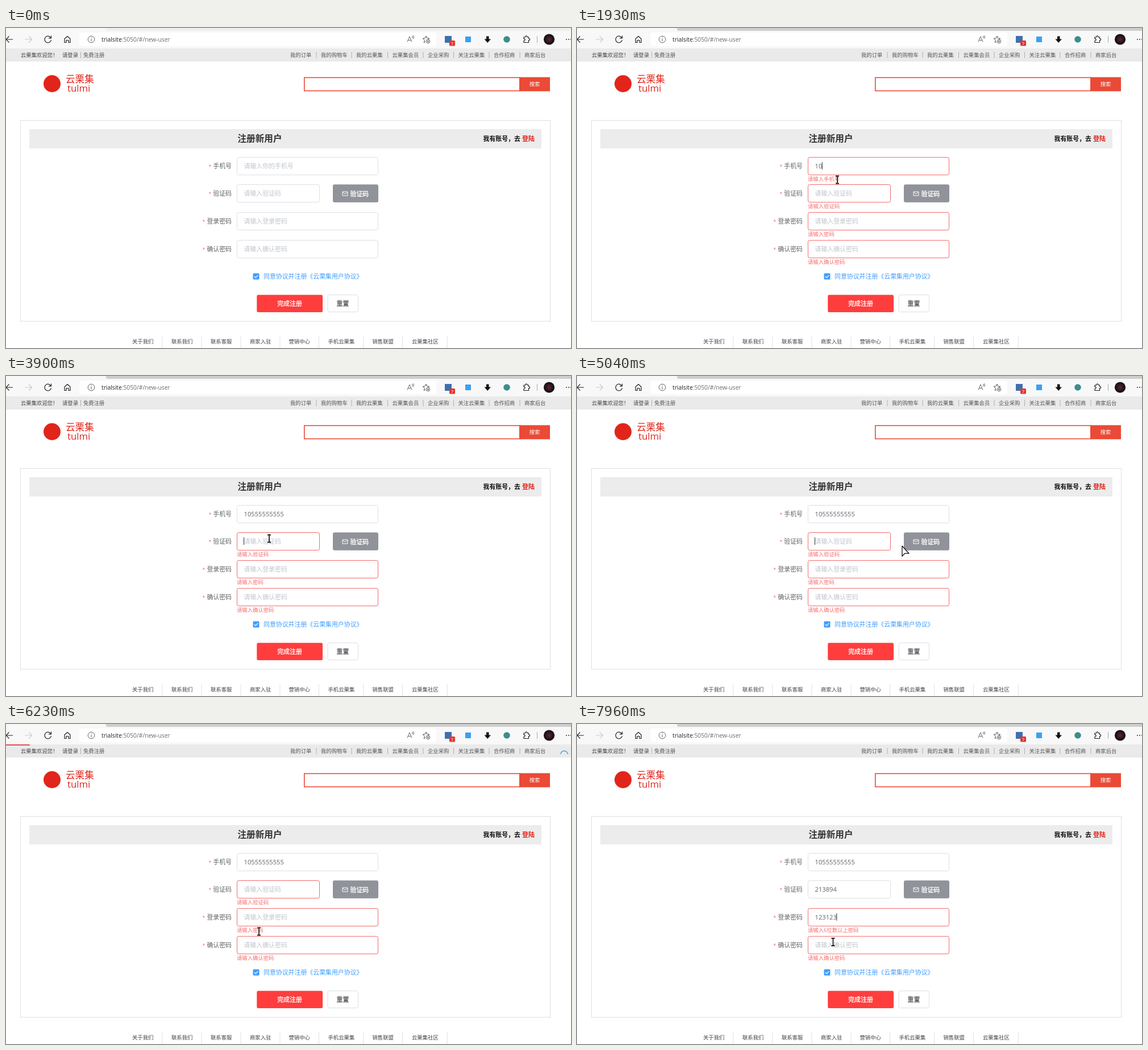
An HTML page for the animation above (7.99 s loop, 994 by 563 pixels).

```html
<!DOCTYPE html>
<html>
<head>
<meta charset="utf-8">
<title>Register</title>
<style>
html, body { margin: 0; width: 100%; height: 100%; overflow: hidden; background: #fff; }
svg { display: block; width: 100%; height: 100%; }
text { font-family: "Open Sans", "Noto Sans CJK SC", "Noto Sans CJK", sans-serif; white-space: pre; }
</style>
</head>
<body>
<svg id="stage" viewBox="0 0 994 563"></svg>
<script>
const LOOP = 7990;
const BRAND = '云栗集';
const SMALL = 9.36, BODY = 10.92;
const RED = '#e1251b', ERROR = '#f56c6c', BLUE = '#409eff', BORDER = '#dcdfe6', DARK = '#222';
const stage = document.getElementById('stage');

function el(tag, attrs, parent = stage) {
  const node = document.createElementNS('http://www.w3.org/2000/svg', tag);
  for (const key in attrs) node.setAttribute(key, attrs[key]);
  return parent.appendChild(node);
}
const rect = (x, y, width, height, fill, more) => el('rect', { x, y, width, height, fill, ...more });
const path = (d, stroke, width = 1.2, more) =>
  el('path', { d, stroke, 'stroke-width': width, fill: 'none', 'stroke-linejoin': 'round', ...more });
const circle = (cx, cy, r, fill, more) => el('circle', { cx, cy, r, fill, ...more });
// y is the vertical middle of the glyphs
function text(x, y, size, fill, content, more) {
  const node = el('text', { x, y: y + size * 0.37, 'font-size': size, fill, ...more });
  node.textContent = content;
  return node;
}
// a thin outline stands in for a medium weight
const medium = (x, y, color, content, anchor = 'start') =>
  text(x, y, BODY, color, content, { 'text-anchor': anchor, stroke: color, 'stroke-width': 0.3 });

function drawBrowserBar() {
  rect(0, 0, 994, 36, '#f8f8f8');
  rect(129, 8, 628, 24, '#fff', { rx: 4 });
  path('M12 20H0M5.5 14.5 0 20 5.5 25.5', DARK);
  path('M33 20H45M40 14.5 45.5 20 40 25.5', '#ccc');
  path('M79 17.5A5.8 5.8 0 1 0 79.5 21M79.5 13.5V17.8H75', DARK);
  path('M103 19 108 14.5 113 19V25.5H110V21.5H106V25.5H103Z', DARK);
  circle(150, 20, 5.8, 'none', { stroke: '#666' });
  path('M150 19V23.2M150 16.6V17.8', '#666', 1.1);
  const url = text(168, 20, 10.3, DARK, 'trialsite');
  el('tspan', { fill: '#6b6b6b' }, url).textContent = ':5050/#/new-user';
  path('M706 24.5 710 15 714 24.5M707.3 21.5H712.7M714.5 14Q716 16 714.5 18M716.5 13Q718.5 16 716.5 19', '#666', 1);
  path('M739 14 740.7 18 745 18.3 742 20.5M739 14 737.3 18 733 18.3 736.3 21.2 735.3 25.5 738 24', '#555', 1);
  circle(742.5, 23.5, 3.2, '#fff', { stroke: '#555' });
  path('M740.7 23.5H744.3M742.5 21.7V25.3', '#555', 0.9);
  rect(772, 14, 12, 12, '#3f6fb0');
  rect(780, 22, 10, 9.5, '#e5352c', { rx: 1.5 });
  text(785, 26.8, 7.5, '#fff', '7', { 'text-anchor': 'middle' });
  rect(808, 15, 10, 10, '#3aa0f3');
  path('M845 14.5H849.5V19.5H853L847.2 26 841.5 19.5H845Z', 'none', 0, { fill: '#111' });
  circle(881, 20, 5.8, '#3a8f8d');
  path('M911 16H914Q914 13.5 916 14Q917.6 14.5 917 16H919.5V18.5Q922 18.5 921.5 20.5Q921 22 919.5 21.5V25.5H911V22.5Q913.5 22 913 20Q912.5 18.6 911 19Z', '#222');
  path('M934.5 14V26', '#aaa', 1);
  const glow = el('radialGradient', { id: 'avatar' }, el('defs', {}));
  el('stop', { offset: 0, 'stop-color': '#65242a' }, glow);
  el('stop', { offset: 0.8, 'stop-color': '#17111a' }, glow);
  circle(955.5, 20, 9.6, 'url(#avatar)');
  [986, 990, 994].forEach(x => circle(x, 20, 0.9, DARK));
}

function drawHeader() {
  rect(0, 36, 994, 23, '#eaeaea');
  text(26, 47.5, SMALL, '#444', BRAND + '欢迎您！');
  text(99, 47.5, SMALL, '#444', '请登录');
  text(136, 47.5, SMALL, '#555', '免费注册');
  path('M131.5 42V53', '#b3aeae', 1);
  const menu = [[500, '我的订单'], [554, '我的购物车'], [616, '我的' + BRAND], [679.5, BRAND + '会员'],
    [742, '企业采购'], [795.5, '关注' + BRAND], [858, '合作招商'], [912, '商家后台']];
  menu.forEach(([x, label], i) => {
    text(x, 47.5, SMALL, '#555', label);
    if (i) path(`M${x - 8} 42V53`, '#b3aeae', 1);
  });
  circle(81, 98, 15, RED);
  text(105, 90, 16.6, RED, BRAND);
  text(108, 105.5, 16.8, RED, 'tulmi');
  rect(524.8, 87.3, 379, 23.2, '#fff', { stroke: '#ea4a36', 'stroke-width': 1.6 });
  rect(903, 86.5, 54, 24.8, '#ea4a36');
  text(930, 99, SMALL, '#fff', '搜索', { 'text-anchor': 'middle' });
}

function drawFormFrame() {
  rect(25.5, 162.5, 932, 353.5, '#fff', { stroke: '#dfdfdf' });
  rect(41, 178, 901, 34, '#ececec');
  text(407.5, 194.5, 15.6, '#303133', '注册新用户', { 'font-weight': 700 });
  text(839.5, 194.5, BODY, '#111', '我有账号，去', { 'font-weight': 700 });
  text(908, 194.5, BODY, RED, '登陆', { 'font-weight': 700 });

  rect(434.5, 431.5, 11, 11, BLUE, { rx: 1.6 });
  path('M437 437 439.3 439.3 443.2 434.8', '#fff');
  text(453, 436.5, BODY, BLUE, `同意协议并注册《${BRAND}用户协议》`);
  rect(441.3, 469.6, 115.8, 30.4, '#ff3d3d', { rx: 2.5 });
  medium(499, 485, '#fff', '完成注册', 'middle');
  rect(566, 469.5, 53.5, 30, '#fff', { rx: 3, stroke: BORDER });
  medium(592.5, 484.7, '#606266', '重置', 'middle');
}

function drawFooter() {
  const links = [[222, '关于我们'], [291, '联系我们'], [360, '联系客服'], [429, '商家入驻'],
    [497.5, '营销中心'], [566.5, '手机' + BRAND], [644.5, '销售联盟'], [714, BRAND + '社区']];
  links.forEach(([x, label]) => {
    text(x, 552, SMALL, '#444', label);
    path(`M${x + label.length * SMALL + 15.5} 542V563`, '#e2e2e2', 1);
  });
}

function makeField(y, width, label, hint, warning) {
  const middle = y + 16;
  const box = { x: 406.5, y: y + 0.5, width, height: 31, rx: 3, fill: 'none' };
  text(397, middle, BODY, '#606266', label, { 'text-anchor': 'end' });
  text(394 - label.length * BODY, middle + 0.4, 8.5, ERROR, '*', { 'text-anchor': 'end' });
  el('rect', { ...box, stroke: BORDER });
  return {
    alert: el('rect', { ...box, stroke: ERROR }),
    hint: text(418.5, middle, BODY, '#c0c4cc', hint),
    value: text(418.5, middle, 11.2, '#606266', ''),
    warning: text(406, y + 39, SMALL, ERROR, warning),
    middle
  };
}

drawBrowserBar();
const tabStrip = path('M994 0H176V2Q176 5 179 5H994Z', 'none', 0);
drawHeader();
drawFormFrame();
drawFooter();
const phone = makeField(227, 248, '手机号', '请输入你的手机号', '请输入手机号');
const code = makeField(275, 145, '验证码', '请输入验证码', '请输入验证码');
const password = makeField(324, 248, '登录密码', '请输入登录密码', '请输入密码');
const confirmation = makeField(373, 248, '确认密码', '请输入确认密码', '请输入确认密码');

const codeButton = rect(575, 275.2, 80, 31.6, '#909399', { rx: 3 });
path('M592 288H601V295H592ZM592.5 289 596.5 292 600.5 289', '#fff', 1);
medium(605.5, 291.5, '#fff', '验证码');

const progress = rect(0, 36, 0, 1.6, '#dd2c2c');
const spinner = path('M977.6 57.4A6.3 6.3 0 0 1 986.4 48.5', '#4fa3df', 1.6);
const caret = rect(0, 0, 1, 13, '#333');
const cursors = {
  arrow: path('M0 0V18L4.6 13.2H12Z', '#111', 1.3, { fill: '#fff' }),
  beam: path('M-3-6.5H3M-3 6.5H3M0-6.5V6.5', '#222', 1.8),
  hand: path('M-1.5 8.5-5.5 3Q-6-.5-2.5 2V-5Q-1-7.5.5-5V-1Q2.5-2 3.5 0 5.5-.7 6 1 8 .5 8 3L6.5 9V10H-1.5Z', '#111', 1.1, { fill: '#fff' })
};

const clamp = v => Math.max(0, Math.min(1, v));
const ramp = (t, from, to) => clamp((t - from) / (to - from));
const smooth = u => u * u * (3 - 2 * u);

const phoneInput = { start: 1562, step: 191.6, content: '10555555555' };
const passwordInput = { start: 7100, step: 130, content: '123123' };
const SUBMITTED = 520, REQUESTED = 6110, FILLED = 6500;
const countTyped = (input, t) => t < input.start ? 0 :
  Math.min(input.content.length, 1 + Math.floor((t - input.start) / input.step));

const focuses = [
  { field: phone, from: 1480, to: 3780, input: phoneInput },
  { field: code, from: 3780, to: 5500 },
  { field: password, from: 6680, to: LOOP, input: passwordInput }
];

// time, x, y
const route = [
  [60, 720, 563], [460, 503, 481], [850, 503, 481], [1400, 455, 245], [1640, 455, 245],
  [1930, 458, 267], [2170, 463, 284], [3600, 463, 286], [4250, 463, 286], [4430, 488, 286],
  [4620, 496, 291], [4820, 540, 316], [5040, 572, 299], [5350, 612, 294], [5560, 612, 294],
  [6230, 445, 365], [6600, 450, 341], [7100, 455, 345], [7800, 472, 366], [7960, 450.5, 383.5]
];

function cursorAt(t) {
  const next = route.findIndex(point => point[0] > t);
  if (next < 0) return route[route.length - 1].slice(1);
  const [t0, x0, y0] = route[next - 1] || route[0], [t1, x1, y1] = route[next];
  const u = smooth(ramp(t, t0, t1));
  return [x0 + (x1 - x0) * u, y0 + (y1 - y0) * u];
}

const inside = (x, y, left, top, right, bottom) => x >= left && x <= right && y >= top && y <= bottom;
const overCodeButton = (x, y) => inside(x, y, 575, 275, 655, 307);
function cursorKind(x, y) {
  if (inside(x, y, 441, 469, 557, 501) || overCodeButton(x, y)) return 'hand';
  return inside(x, y, 406, 227, 552, 404) ? 'beam' : 'arrow';
}

function setField(field, value, alert) {
  field.value.textContent = value;
  field.hint.setAttribute('opacity', value ? 0 : 1);
  field.alert.setAttribute('opacity', alert);
  field.warning.setAttribute('opacity', alert);
}

function renderCaret(t) {
  const focus = focuses.find(f => t >= f.from && t < f.to);
  let visible = false;
  if (focus) {
    const { field, input } = focus;
    const count = input ? countTyped(input, t) : 0;
    const lastEdit = count ? input.start + (count - 1) * input.step : focus.from;
    visible = (t - lastEdit) % 1060 < 530;
    caret.setAttribute('x', 418 + count * 6.4);
    caret.setAttribute('y', field.middle - 7);
  }
  caret.setAttribute('opacity', visible ? 1 : 0);
}

function renderProgress(t) {
  const width = 0.083 * smooth(ramp(t, REQUESTED, 6350)) + 0.917 * smooth(ramp(t, FILLED, 6700));
  const opacity = t < REQUESTED ? 0 : 1 - ramp(t, 6720, 6920);
  progress.setAttribute('width', 994 * width);
  progress.setAttribute('opacity', opacity);
  spinner.setAttribute('opacity', opacity);
  spinner.setAttribute('transform', `rotate(${45 + (t - 6230) * 0.9} 982 53)`);
}

function render(t) {
  const alert = ramp(t, SUBMITTED, SUBMITTED + 200);
  setField(phone, phoneInput.content.slice(0, countTyped(phoneInput, t)), alert * (1 - ramp(t, 3780, 3890)));
  setField(code, t < FILLED ? '' : '213894', alert * (1 - ramp(t, FILLED, FILLED + 150)));
  setField(password, passwordInput.content.slice(0, countTyped(passwordInput, t)), alert);
  setField(confirmation, '', alert);
  password.warning.textContent = t < passwordInput.start ? '请输入密码' : '请输入6位数以上密码';

  // the window becomes active with the first click
  tabStrip.setAttribute('fill', t < SUBMITTED ? '#f0f0f0' : '#cecece');
  renderCaret(t);
  renderProgress(t);

  const [x, y] = cursorAt(t);
  const kind = cursorKind(x, y);
  for (const name in cursors) {
    cursors[name].setAttribute('opacity', t >= 60 && name === kind ? 1 : 0);
    cursors[name].setAttribute('transform', `translate(${x} ${y})`);
  }
  codeButton.setAttribute('fill', overCodeButton(x, y) ? '#a6a9ad' : '#909399');
}

const began = performance.now();
function tick() {
  render((performance.now() - began) % LOOP);
  requestAnimationFrame(tick);
}
tick();
</script>
</body>
</html>
```
